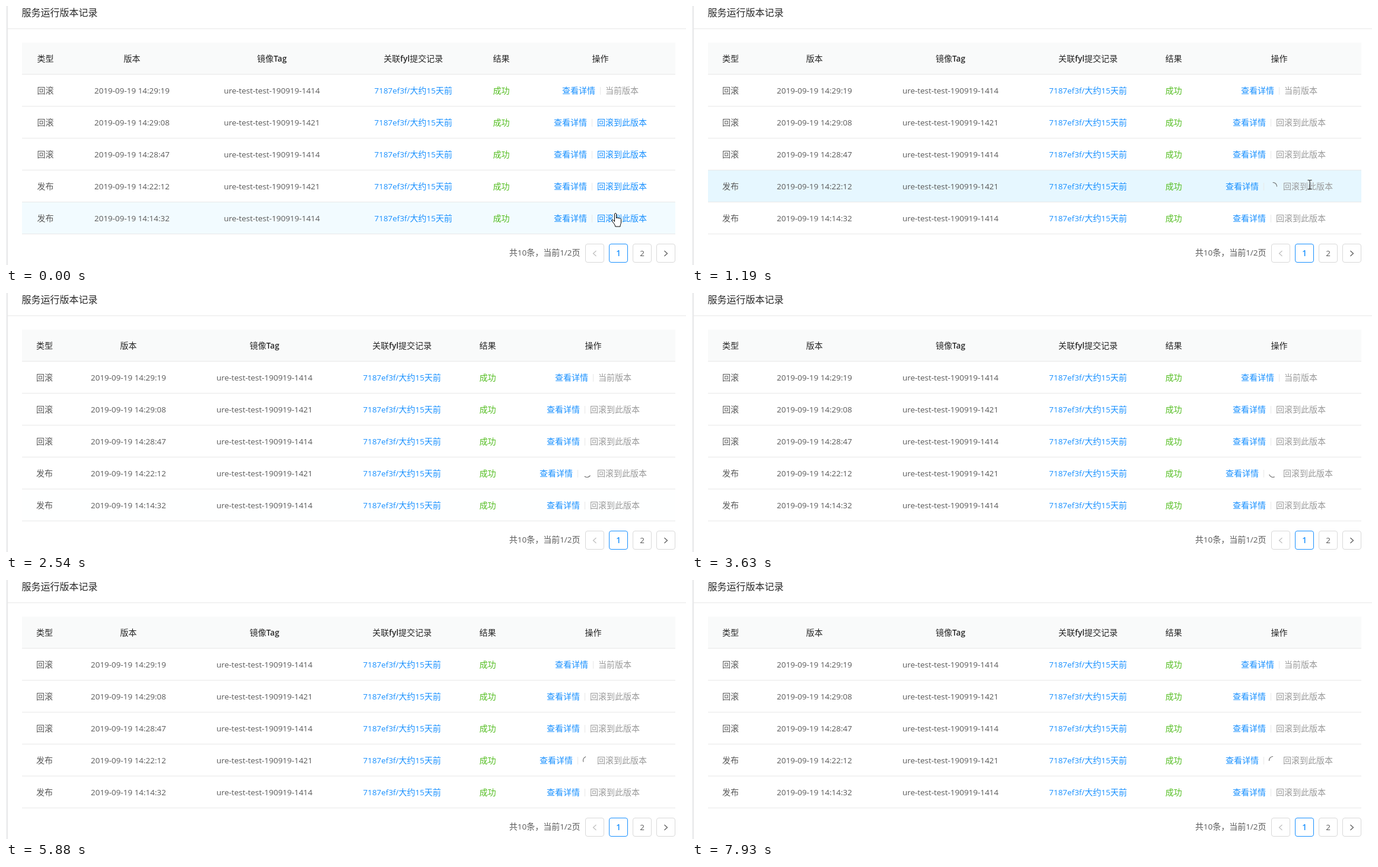
Write an HTML page that moves like this. It is 1147x438 px and loops after 8 s.

```html
<!DOCTYPE html>
<html lang="zh-CN">
<head>
<meta charset="utf-8">
<style>
html, body { margin: 0; width: 100%; height: 100%; overflow: hidden; background: #fff; }
svg { display: block; }
text { font: 14px "Noto Sans CJK SC", "Noto Sans CJK", sans-serif; fill: #595959; }
.latin { font: 13.45px "Open Sans", sans-serif; }
.head, .title { fill: #262626; }
.head .latin, .active .latin { font-weight: 600; }
.title { font-size: 16px; }
.link, .active { fill: #1890ff; }
.ok { fill: #52bd1f; }
.off { fill: #999; }
</style>
</head>
<body>
<svg id="stage" width="1147" height="438" viewBox="0 0 1147 438"></svg>
<script>
const LOOP = 8000, LOADING_AT = 1100;
const ROW_TOP = 116, ROW_HEIGHT = 54;
const HEADS = ['类型', '版本', '镜像Tag', '关联fyl提交记录', '结果', '操作'];
const ROWS = [
  ['回滚', '14:29:19', 1414],
  ['回滚', '14:29:08', 1421],
  ['回滚', '14:28:47', 1414],
  ['发布', '14:22:12', 1421],
  ['发布', '14:14:32', 1414]
];
const IDLE_COLUMNS = [66.5, 212.5, 448.5, 687, 835.5, 1002.5];
const LOADING_COLUMNS = [65, 206.5, 436, 668, 812.5, 990.5];

const rect = (x, y, w, h, fill, extra = '') =>
  `<rect x="${x}" y="${y}" width="${w}" height="${h}" fill="${fill}" ${extra}/>`;

function label(x, y, text, cls = '', anchor = 'middle') {
  const runs = text.replace(/[!-~]+( [!-~]+)*/g, '<tspan class="latin">$&</tspan>');
  return `<text x="${x}" y="${y}" class="${cls}" text-anchor="${anchor}">${runs}</text>`;
}

function actions(center, y, index, loading) {
  const busy = loading && index === 3;
  const text = index ? '回滚到此版本' : '当前版本';
  const width = 73 + text.length * 14 + (busy ? 24 : 0);
  const left = center - width / 2;
  return label(left, y, '查看详情', 'link', 'start')
    + rect(Math.floor(left + 64), y - 11, 1, 13, '#e8e8e8')
    + label(left + width, y, text, index && !loading ? 'link' : 'off', 'end');
}

function table(id, columns, loading) {
  const heads = HEADS.map((text, i) => label(columns[i], 94, text, 'head'));
  const rows = ROWS.map(([type, time, tag], i) => {
    const y = ROW_TOP + i * ROW_HEIGHT + 32;
    return label(columns[0], y, type)
      + label(columns[1], y, '2019-09-19 ' + time)
      + label(columns[2], y, 'ure-test-test-190919-' + tag)
      + label(columns[3], y, '7187ef3f/大约15天前', 'link')
      + label(columns[4], y, '成功', 'ok')
      + actions(columns[5], y, i, loading);
  });
  return `<g id="${id}">${heads.join('')}${rows.join('')}</g>`;
}

const pageButton = (x, border, content) =>
  rect(x + .5, 402.5, 31, 31, '#fff', `rx="3.5" stroke="${border}"`) + content;

const chevron = (x, dir, color) =>
  `<path d="M${x - 2.5 * dir} 414l${5 * dir} 4.5l${-5 * dir} 4.5" fill="none" stroke="${color}" stroke-width="1.2"/>`;

const rowLines = ROWS.map((_, i) => rect(27, ROW_TOP + i * ROW_HEIGHT + 53, 1102, 1, '#e8e8e8')).join('');

document.getElementById('stage').innerHTML =
  rect(0, 0, 2, 438, '#f0f1f2') + rect(2, 0, 1, 438, '#e4e4e4')
  + label(26.5, 16.5, '服务运行版本记录', 'title', 'start')
  + rect(3, 38, 1144, 1, '#e8e8e8')
  + rect(27, 62, 1102, 53, '#f9fafa') + rect(27, 115, 1102, 1, '#e8e8e8')
  + rect(27, 278, 1102, 53, '#e6f7ff', 'id="hover3"')
  + rect(27, 332, 1102, 53, '#e6f7ff', 'id="hover4"')
  + rowLines
  + table('idle', IDLE_COLUMNS, false)
  + table('loading', LOADING_COLUMNS, true)
  + '<path id="spinner" d="M0-6.5A6.5 6.5 0 0 1 6.5 0" fill="none" stroke="#666" stroke-width="1.1" stroke-linecap="round"/>'
  + label(968.5, 422, '共10条，当前1/2页', '', 'end')
  + pageButton(977, '#d9d9d9', chevron(993, -1, '#bfbfbf'))
  + pageButton(1017, '#1890ff', label(1033, 423, '1', 'active'))
  + pageButton(1057, '#d9d9d9', label(1073, 423, '2'))
  + pageButton(1097, '#d9d9d9', chevron(1113, 1, '#595959'))
  + `<path id="hand" fill="#fff" stroke="#000" stroke-linejoin="round" d="M.5 1.5c0-1.3 3-1.3 3 0V9c0-1.5 3-1.3 3 .2
      .3-1.3 2.6-1 2.7.4.4-1 2.3-.7 2.3 1V16c0 2-1.5 3.5-1.5 7H1.8C1.5 19-3 15.5-4 13c-.5-1.5 1.2-2.3 2.3-1L.5 14.5Z"/>`
  + '<path id="beam" fill="none" stroke="#222" d="M-3.5-7.5H-1L0-7 1-7.5H3.5M0-7V7M-3.5 7.5H-1L0 7 1 7.5H3.5"/>'
  + '<path id="arrow" fill="#fff" stroke="#000" d="M.5.5V16.5L4.2 13 6.6 18.5 9 17.5 6.6 12.2H11.8Z"/>';

// Linear interpolation through [time, ...values] keys.
function track(t, keys) {
  const next = keys.findIndex(key => key[0] > t);
  if (next < 0) return keys[keys.length - 1].slice(1);
  if (next === 0) return keys[0].slice(1);
  const a = keys[next - 1], b = keys[next];
  const k = (t - a[0]) / (b[0] - a[0]);
  return a.slice(1).map((v, i) => v + (b[i + 1] - v) * k);
}

const HOVER3 = [[170, 0], [470, 1], [2030, 1], [2330, 0]];
const HOVER4 = [[0, .5], [90, 1], [170, 1], [470, 0], [2030, 0], [2270, .8], [2560, 0]];
const POINTER = [
  [0, 1026, 350], [80, 1026, 350], [470, 1034, 295], [939, 1034, 295], [940, 1041, 289],
  [1099, 1041, 289], [1100, 1042, 302], [1500, 1042, 302], [1890, 1050, 324],
  [2130, 1057, 352], [2480, 1098, 445]
];

const parts = {};
for (const el of document.querySelectorAll('[id]')) parts[el.id] = el;
const show = (el, on) => el.setAttribute('visibility', on ? 'visible' : 'hidden');

function draw() {
  const t = performance.now() % LOOP;
  const loading = t >= LOADING_AT;
  show(parts.idle, !loading);
  show(parts.loading, loading);
  show(parts.spinner, loading);
  parts.spinner.setAttribute('transform', `translate(980 305) rotate(${(t - 1190) * .36})`);
  parts.hover3.setAttribute('opacity', track(t, HOVER3)[0]);
  parts.hover4.setAttribute('opacity', track(t, HOVER4)[0]);

  const [x, y] = track(t, POINTER).map(Math.round);
  const cursor = !loading ? 'hand' : y < 370 ? 'beam' : 'arrow';
  for (const name of ['hand', 'beam', 'arrow']) {
    show(parts[name], name === cursor);
    parts[name].setAttribute('transform', `translate(${x} ${y})`);
  }
  requestAnimationFrame(draw);
}
draw();
</script>
</body>
</html>
```
